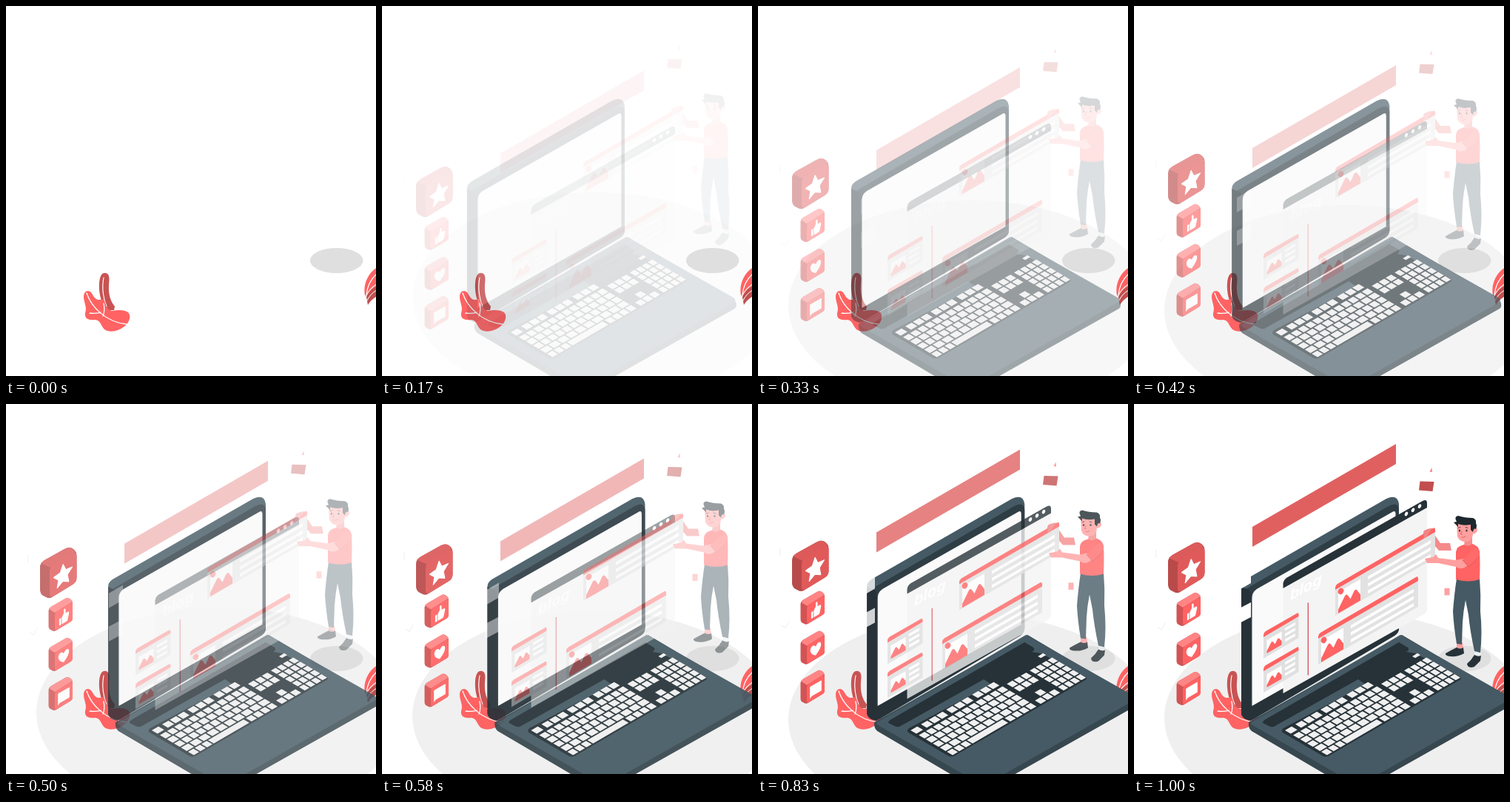
These frames come from a looping animation (500x500 px, 1.04 s). An HTML page with a canvas:

```html
<!DOCTYPE html>
<html lang="en">
<head>
<meta charset="utf-8">
<title>Blog post scene</title>
<style>
html, body { margin: 0; width: 100%; height: 100%; overflow: hidden; background: #fff; }
canvas { display: block; width: 500px; height: 500px; }
</style>
</head>
<body>
<canvas id="stage" width="500" height="500"></canvas>
<script>
const LOOP = 1040, STEPS = 24, SHIFT = 35;
const RED = '#ff6363', SLATE = '#455a64', DARK = '#263238', SKIN = '#ff9f9f';

const stage = document.getElementById('stage').getContext('2d');
const layer = document.createElement('canvas');
layer.width = layer.height = 500;
const pen = layer.getContext('2d');
let g = stage;

// --- easing ---
function bezier(x1, y1, x2, y2) {
  const at = (a, b, s) => 3 * (1 - s) * (1 - s) * s * a + 3 * (1 - s) * s * s * b + s * s * s;
  return x => {
    if (x <= 0) return 0;
    if (x >= 1) return 1;
    let lo = 0, hi = 1;
    for (let i = 0; i < 30; i++) {
      const mid = (lo + hi) / 2;
      if (at(x1, x2, mid) < x) lo = mid; else hi = mid;
    }
    return at(y1, y2, lo);
  };
}
const overshoot = bezier(.36, -.01, .5, 1.38);
const easeIn = bezier(.42, 0, 1, 1);

// --- drawing helpers ---
function fill(color, d) {
  g.fillStyle = color;
  g.fill(new Path2D(d));
}
function line(color, width, d) {
  g.strokeStyle = color;
  g.lineWidth = width;
  g.lineCap = 'round';
  g.stroke(new Path2D(d));
}
function oval(color, x, y, rx, ry, turn = 0) {
  g.fillStyle = color;
  g.beginPath();
  g.ellipse(x, y, rx, ry, turn, 0, Math.PI * 2);
  g.fill();
}
// sloped band with vertical ends
function slab(color, x1, y1, x2, y2, h) {
  fill(color, `M${x1},${y1}L${x2},${y2}V${y2 + h}L${x1},${y1 + h}Z`);
}
function tilted(x, y, m, draw) {
  g.save();
  g.transform(...m, x, y);
  draw();
  g.restore();
}
// draws a part as one sheet, then fades and shifts it
function group(e, dx, dy, draw) {
  if (e <= 0) return;
  g = pen;
  g.setTransform(1, 0, 0, 1, 0, 0);
  g.clearRect(0, 0, 500, 500);
  g.translate(dx * (1 - e), dy * (1 - e));
  draw();
  g = stage;
  g.globalAlpha = Math.min(1, e);
  g.drawImage(layer, 0, 0);
  g.globalAlpha = 1;
}

// --- plants ---
function plants() {
  fill('#c85353', 'M126,374C127,364 130,360 135,361C140,362 140,368 139,376C138,391 142,400 147,406L146,411H134C128,398 125,386 126,374Z');
  line('#fff', 1.2, 'M132,367C129,382 132,397 136,406');
  fill(RED, 'M105,393C105,384 113,382 117,390C121,398 126,398 131,396C136,400 133,409 143,412C151,411 158,410 165,414C170,419 166,429 160,433C151,440 140,442 133,437C128,432 128,425 121,424C112,425 106,423 107,415C110,406 105,401 105,393Z');
  line('#fff', 1.3, 'M109,388C115,406 134,427 163,430M113,415Q121,416 128,414M132,402Q134,412 131,419');
  fill(RED, 'M502,353C490,360 482,375 485,391L489,393L502,380Z');
  line('#fff', 1.2, 'M501,362C493,369 488,379 487,391M501,376C494,380 490,385 487,392');
  fill('#c04f4f', 'M502,378Q490,384 487,393L489,404Q494,396 502,392Z');
  line('#fff', 1, 'M501,384Q492,389 488,398');
}

// --- laptop ---
function key(u, v, w, h = 7.8) {
  const x = 204 + u + v, y = 441 - u * .582 + v * .59;
  fill('#f0f0f0', `M${x},${y}l${w},${-w * .582}l${h},${h * .59}l${-w},${w * .582}Z`);
}
function keyRow(from, to, v, count) {
  const pitch = (to - from) / count;
  for (let i = 0; i < count; i++) key(from + i * pitch, v, pitch - 1.8);
}
function keyboard() {
  fill(DARK, 'M174,431Q174,428 178,426L358,322L370,329Q373,332 368,335L380,337L441,369Q443,371 440,373L264,475Q259,478 254,475L201,444Q198,441 202,438L313,379L303,372L189,436Q185,437 182,435Z');
  key(0, 0, 9);
  keyRow(14, 45, 0, 3);
  keyRow(48, 79, 0, 3);
  keyRow(83, 114, 0, 3);
  key(172, 0, 7, 4);
  keyRow(0, 115, 11, 12);
  keyRow(0, 115, 20.5, 11);
  keyRow(0, 115, 30, 12);
  keyRow(0, 115, 39.5, 10);
  keyRow(0, 27, 49, 3);
  key(27, 49, 48);
  keyRow(78, 115, 49, 4);
  keyRow(119, 147, 11, 3);
  keyRow(119, 147, 20.5, 3);
  key(128, 39.5, 8);
  keyRow(119, 147, 49, 3);
  for (let r = 0; r < 5; r++) keyRow(150, 182, 11 + r * 9.5, 4);
}
function laptop() {
  // base
  fill('#37474f', 'M155,430L362,312L506,397Q509,400 509,405Q509,408 505,410L340,503L302,526L159,442Q154,438 155,430Z');
  fill(SLATE, 'M157,431L360,312L505,394Q510,398 505,401L302.7,516L160,434Z');
  keyboard();
  // lid
  fill(SLATE, 'M145,247Q145,241 151,237L341,128Q356,121 358,135V303Q358,309 352,313L164,425Q152,430 145,420Z');
  fill('#2f3d45', 'M151,250L158,246L344,138Q357,131 358,143V303Q358,309 352,313L162,424L152,424Z');
  fill(DARK, 'M145,247L156,252Q158,253 158,258V428Q145,426 145,417Z');
  fill(DARK, 'M157,408L358,296V304Q357,310 352,313L166,423Q160,427 157,428Z');
  fill('#fafafa', 'M159.5,263Q159,255 166,250L349,146Q353.5,143 353.5,149V298L159.5,408Z');
}

// --- icons ---
function star(x, y, r) {
  tilted(x, y, [.87, -.5, 0, 1], () => {
    g.beginPath();
    for (let i = 0; i < 10; i++) {
      const a = i * Math.PI / 5 - Math.PI / 2, d = i % 2 ? r * .48 : r;
      g.lineTo(Math.cos(a) * d, Math.sin(a) * d);
    }
    g.closePath();
    g.fillStyle = g.strokeStyle = '#fff';
    g.lineWidth = 1.5;
    g.lineJoin = 'round';
    g.fill();
    g.stroke();
  });
}
function tile(y, glyph) {
  g.save();
  g.translate(0, y);
  fill('#d25353', 'M57.5,18Q57.5,14 61,12L80,1Q83,-1 86,1Q90,3 90,8V27Q90,31 86,33L68,44Q65,46 62,44L60,43Q57.5,42 57.5,38Z');
  fill('#ff8585', 'M58,15L61,12L80,1Q83,-1 86,1L90,5L66,20Z');
  fill(RED, 'M66,24Q66,20 69,18L86,8Q90,5 90,9V28Q90,31 86,33L69,43Q66,45 66,41Z');
  tilted(78, 25, [.87, -.5, 0, 1], () => fill('#fff', glyph));
  g.restore();
}
function icons() {
  fill('#b94a4a', 'M46,213Q46,208 52,204L79,189Q86,185 91,189Q95.5,192 95.5,198V228Q95,234 90,237L64,253Q59,257 54,254L50,252Q46,249 46,244Z');
  fill('#dc5a5a', 'M47,208L52,204L79,189Q86,185 91,189L94,193L60,214Z');
  fill('#e15a5a', 'M59,220Q59,213 64,210L89,195.5Q95.5,192 95.5,199V228Q95.5,234 90,237L65,252Q59,256 59,249Z');
  star(77, 225, 15);
  tile(255, 'M-7,0H-4V9H-7ZM-3,0L0,-4V-9Q3,-11 3,-6V-3H7Q9,-2 8,1L6,8Q6,9 3,9H-3Z');
  tile(309, 'M0,8C-13,0 -8,-9 -3,-7Q-1,-6 0,-4Q1,-6 3,-7C8,-9 13,0 0,8Z');
  tile(362, 'M-9,-6Q-9,-7 -8,-7H8Q9,-7 9,-6V6Q9,7 8,7H-6L-9,9Z');
  line('#f1f1f1', 1.2, 'M30,197V207M32,302L37,305L42,296');
}

// --- page ---
function picture(x, y, w, h) {
  const k = w * .58;
  slab('#fff', x, y, x + w, y - k, h);
  const at = (a, b) => `${x + a * w},${y - a * k + b * h}`;
  fill(RED, `M${at(0, 1)}L${at(0, .82)}L${at(.3, .36)}Q${at(.36, .3)} ${at(.42, .4)}L${at(.55, .66)}L${at(.72, .38)}Q${at(.78, .32)} ${at(.84, .42)}L${at(1, .72)}V${y - k + h}Z`);
}
function article(x, y) {
  g.save();
  g.translate(x, y);
  slab('#e2e2e2', 0, 3, 135, -75, 38);
  picture(4, 9, 30, 29);
  oval(RED, 7.5, 8, 3.6, 4.4, .5);
  for (let i = 0; i < 3; i++) slab('#fff', 44, -12 + i * 9.5, 129, -61 + i * 9.5, 4.2);
  fill(RED, 'M0,3Q0,0 3,-2L132,-77Q135,-79 135,-75V-72L0,6Z');
  g.restore();
}
function card(y) {
  g.save();
  g.translate(175, y);
  slab('#e0e0e0', 0, 3, 47.5, -25, 32);
  picture(4.5, 10, 20, 18);
  for (let i = 0; i < 3; i++) slab('#fff', 29, -6 + i * 7.5, 43, -14 + i * 7.5, 3.6);
  fill(RED, 'M0,3Q0,0 3,-2L45,-26Q47.5,-28 47.5,-24V-22L0,6Z');
  g.restore();
}
function page() {
  slab('#e06060', 160, 166, 354, 54, 27);
  slab('#fff', 139, 233, 158, 222, 20);
  slab('#fff', 139, 278, 158, 268, 20);
  fill('#f4f4f4', 'M201.5,248L396,140V277Q396,281 392,284L201.5,391Z');
  fill(DARK, 'M201.5,249V243Q202,238 206,235L390,131Q396,128 396,134V140Z');
  for (let i = 0; i < 3; i++) oval('#fff', 368 + i * 9, 148.5 - i * 5.2, 2, 3, .45);
  tilted(211, 266, [1, -.557, 0, 1], () => {
    g.fillStyle = '#fff';
    g.font = 'italic 700 20px Inter, sans-serif';
    g.fillText('blog', 0, 0);
  });
  line('#d9606a', 1.5, 'M235.3,269V366');
  card(309);
  card(355);
  article(249, 311);
}

// --- man with the article he holds ---
function man() {
  fill('#c24e4e', 'M386.5,104.5L405.5,105L403.5,118L385,116.5Z');
  fill('#ff7c7c', 'M399.5,91.5L402.5,86L402.8,92Z');
  fill('#ffa0a0', 'M419.5,249H426.5V258.5H419.5Z');

  fill('#f58a8a', 'M391,173Q395,168 403,168L407,178L414,188H427L429,198H412L405,190L391,182Z');
  article(272, 245);
  fill('#f08585', 'M392,171Q397,169 402,170L398,175Q396,181 391,181Z');

  // legs
  fill(SKIN, 'M436,322H444L445,331H436Z');
  fill('#eceff1', 'M460,333L469,335L468,342H460Z');
  fill(DARK, 'M421,337Q428,333 436,329Q441,332 445,329L446,337Q438,342 427,341Q420,340 421,337ZM450,351Q456,346 460,339Q465,342 469,340L468,347Q463,352 460,355Q451,358 450,351Z');
  fill(SLATE, 'M436,236L467,235Q469,258 468,280Q471,310 468,336L460,334Q454,306 452,285L448,265Q445,280 444,295L443,325L436,324Q432,300 431,280Q433,255 436,236Z');

  // body
  fill('#f58c8c', 'M447,180H457V192Q452,196 446,193Z');
  fill(RED, 'M435,200Q436,192 446,190Q452,194 457,189Q465,191 467,199Q468,216 467,237Q452,242 435,237Z');
  fill(SKIN, 'M393,209L404,207L408,203L411,208L434,211L445,209L452,217Q443,226 435,220L411,215L396,215Z');
  fill('#ff6a6a', 'M444,211Q453,202 460,195Q467,196 467,205Q462,214 452,220Z');
  line('#d65555', .7, 'M444,211L452,220Q461,214 466,206');

  // head
  fill(SKIN, 'M436,160H459V168Q464,165 464,171Q462,176 458,175Q458,184 450,186Q440,187 437,179Z');
  fill('#1d282e', 'M432,160L436,159Q432,152 438,151Q447,154 458,154Q463,156 462,161Q464,164 462,169Q459,167 458,173L455,170L455,163Q445,165 438,162L438,166Z');
  oval(DARK, 440, 171, 1.1, 1.5);
  oval(DARK, 449.5, 171, 1.1, 1.5);
  line(DARK, .8, 'M438,167.5L441,166.5M448,166.5L451,167.5');
  line('#d65555', .8, 'M443,172L441.5,176H443.5M443,180Q446,181 448,179');
}

function render(step) {
  const p = step < 2 ? 0 : step / STEPS + .03;
  const a = overshoot(p), b = easeIn(p);
  g = stage;
  g.fillStyle = '#fff';
  g.fillRect(0, 0, 500, 500);
  group(a, 0, -SHIFT, () => oval('#efefef', 288, 424, 247, 142.5));
  oval('#dfdfdf', 446.7, 344, 35.8, 17);
  plants();
  group(a, -SHIFT, 0, laptop);
  group(a, 0, SHIFT, icons);
  group(b, 0, SHIFT, page);
  group(b, 0, -SHIFT, man);
}

// 24 steps a second, on a 10 ms grid
let start = null;
function tick(now) {
  if (start === null) start = now;
  const t = (now - start) % LOOP;
  let step = 0;
  while (step < STEPS && Math.round((step + 1) * 100 / STEPS) * 10 <= t) step++;
  render(step);
  requestAnimationFrame(tick);
}
render(0);
requestAnimationFrame(tick);
</script>
</body>
</html>
```
